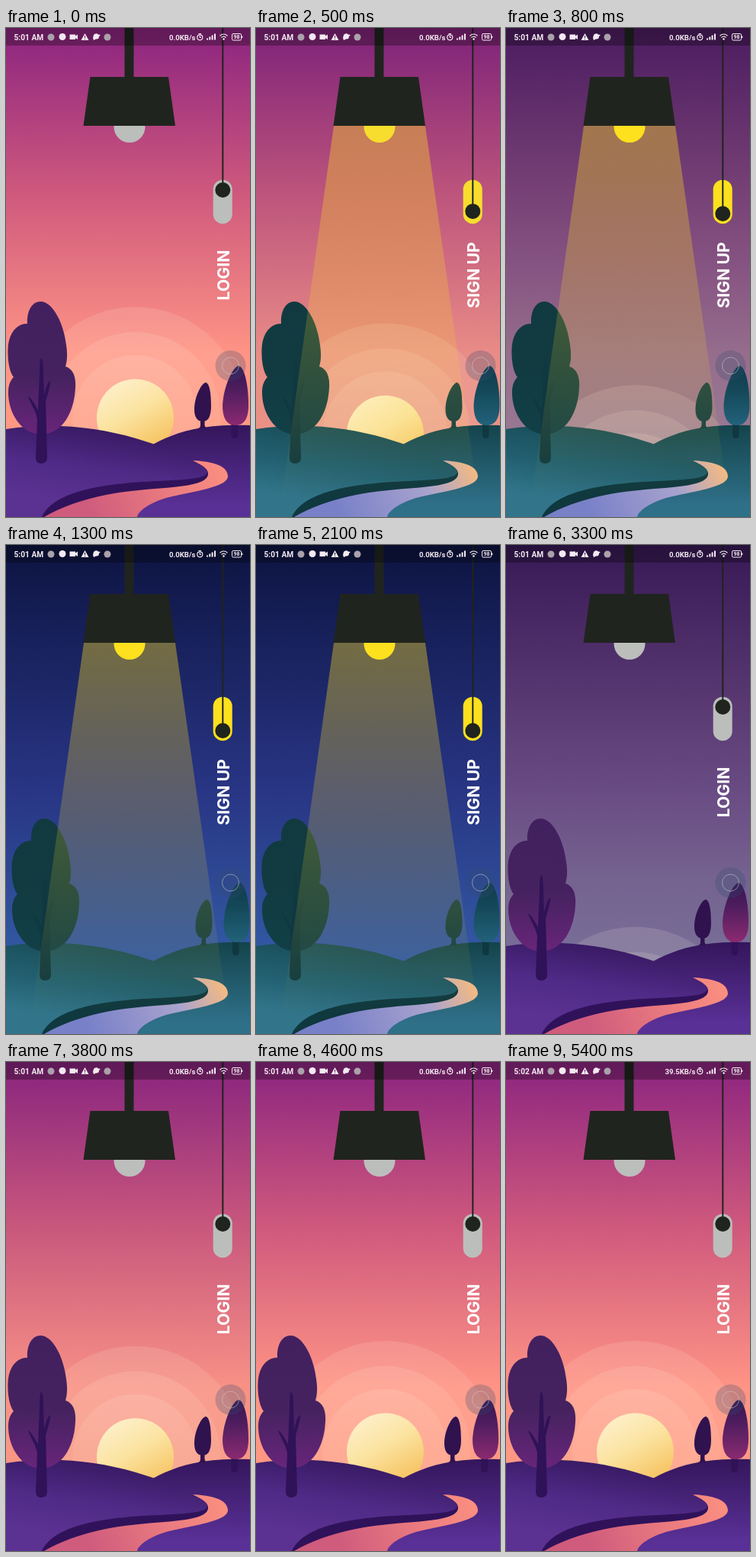
These frames come from a looping animation (320 px wide and 640 px high, 5500 ms). An HTML page:

```html
<!DOCTYPE html>
<html lang="en">
<head>
<meta charset="utf-8">
<title>Day and night lamp</title>
<style>
html, body { margin: 0; width: 100%; height: 100%; overflow: hidden; background: #8c2480; }
svg {
  display: block; width: 100%; height: 100%;
  --hill-top: #35185f; --hill-mid: #4f2a86; --hill-low: #5b3191;
  --back-top: #34165c; --back-low: #593096; --shade: #30125a;
  --road-a: #fb8f80; --road-b: #ee7f80; --road-c: #cf5b7d;
  --tree-top: #42205f; --tree-mid: #45225f; --tree-low: #68257a; --trunk: #2f1257;
  --pine: #30124f; --far-top: #35144f; --far-mid: #4f1d5f; --far-low: #8c2a70;
}
svg.night {
  --hill-top: #194a54; --hill-mid: #215f70; --hill-low: #32758a;
  --back-top: #14444c; --back-low: #2f7089; --shade: #0f383f;
  --road-a: #f5b983; --road-b: #a9a3cf; --road-c: #7880c8;
  --tree-top: #113a40; --tree-mid: #113b41; --tree-low: #123f47; --trunk: #0f3840;
  --pine: #123c44; --far-top: #103c4c; --far-mid: #144858; --far-low: #22627c;
}
.night .big { transform: translateX(5px); }
.night .small { transform: translateX(1.5px); }
.label { font: 700 21.3px Inter, sans-serif; fill: #fff; text-anchor: middle; }
.status { font: 700 10.2px Roboto, sans-serif; fill: #f3eaf2; }
.dark { fill: #20241e; }
</style>
</head>
<body>
<svg id="stage" viewBox="0 0 320 640" preserveAspectRatio="none">
  <defs>
    <linearGradient id="daySky" x2="0" y2="1">
      <stop stop-color="#8c2480"/><stop offset=".333" stop-color="#ce587d"/>
      <stop offset=".667" stop-color="#ff9485"/><stop offset="1" stop-color="#ff9d80"/>
    </linearGradient>
    <linearGradient id="nightSky" x2="0" y2="1">
      <stop stop-color="#0d1441"/><stop offset=".5" stop-color="#283584"/><stop offset="1" stop-color="#376ab2"/>
    </linearGradient>
    <linearGradient id="sunFill" x1=".2" y1="0" x2=".75" y2="1">
      <stop stop-color="#fdf0cd"/><stop offset=".45" stop-color="#fbe3a0"/><stop offset="1" stop-color="#f5bd55"/>
    </linearGradient>
    <linearGradient id="halo" x2="0" y2="1">
      <stop stop-color="#fff0e0" stop-opacity=".14"/><stop offset=".6" stop-color="#ffe8cc" stop-opacity=".08"/>
    </linearGradient>
    <linearGradient id="hill" gradientUnits="userSpaceOnUse" x1="140" y1="520" x2="125" y2="625">
      <stop style="stop-color:var(--hill-top)"/><stop offset=".55" style="stop-color:var(--hill-mid)"/>
      <stop offset="1" style="stop-color:var(--hill-low)"/>
    </linearGradient>
    <linearGradient id="back" gradientUnits="userSpaceOnUse" x1="0" y1="520" x2="0" y2="625">
      <stop style="stop-color:var(--back-top)"/><stop offset="1" style="stop-color:var(--back-low)"/>
    </linearGradient>
    <linearGradient id="road" gradientUnits="userSpaceOnUse" x1="285" y1="570" x2="110" y2="640">
      <stop style="stop-color:var(--road-a)"/><stop offset=".35" style="stop-color:var(--road-b)"/>
      <stop offset="1" style="stop-color:var(--road-c)"/>
    </linearGradient>
    <linearGradient id="leaves" x2="0" y2="1">
      <stop style="stop-color:var(--tree-top)"/><stop offset=".55" style="stop-color:var(--tree-mid)"/>
      <stop offset="1" style="stop-color:var(--tree-low)"/>
    </linearGradient>
    <linearGradient id="farLeaves" x2="0" y2="1">
      <stop style="stop-color:var(--far-top)"/><stop offset=".4" style="stop-color:var(--far-mid)"/>
      <stop offset="1" style="stop-color:var(--far-low)"/>
    </linearGradient>
    <linearGradient id="beamFill" gradientUnits="userSpaceOnUse" x1="0" y1="128" x2="0" y2="615">
      <stop stop-color="#fddc1e" stop-opacity=".4"/><stop offset="1" stop-color="#fddc1e" stop-opacity="0"/>
    </linearGradient>
  </defs>

  <rect width="320" height="640" fill="url(#daySky)"/>
  <rect id="dusk" width="320" height="640" fill="url(#nightSky)"/>

  <g id="sun">
    <g fill="url(#halo)">
      <circle cx="169.5" cy="510" r="145"/>
      <circle cx="169.5" cy="510" r="112"/>
      <circle cx="169.5" cy="510" r="82"/>
    </g>
    <circle cx="169.5" cy="510" r="50.5" fill="url(#sunFill)"/>
  </g>

  <!-- hills and road -->
  <path fill="url(#back)" d="M185 549C220 530 250 518 320 520V640H120V575Z"/>
  <path fill="url(#road)" d="M243 566C275 567 291 574 291 587C290 602 240 607 210 615C190 621 174 631 172 640H46L130 596L264 583Z"/>
  <path style="fill:var(--shade)" d="M243 566C256 571 266 577 265 584C264 597 235 600 195 603C145 607 96 614 50 640H0V600Z"/>
  <path fill="url(#hill)" d="M0 525C60 516 118 522 170 537C215 550 264 572 264 581C264 590 235 591 200 593C120 596 62 608 47 640H0Z"/>

  <!-- trees -->
  <g class="big">
    <path fill="url(#leaves)" d="M45 358C62 358 76 388 79 415C81 428 80 436 78 443C88 446 92 457 91 470C90 500 76 531 46 532C18 531 3 502 3 477C3 467 6 461 10 457C2 447 1 421 4 409C8 394 17 387 28 387C27 371 34 358 45 358Z"/>
    <path style="fill:var(--trunk)" d="M46 432C48 432 49 440 49 452L50 481C52 472 54 464 58 462C59 465 55 478 52 489L54 562Q54 570 46 570Q39 570 39 562L41 512C39 500 32 492 29 482C33 484 38 493 42 500L44 452C44 440 45 432 46 432Z"/>
  </g>
  <g class="small">
    <path style="fill:var(--pine)" d="M262 464C267 465 269 478 269 494C269 509 265 515 258 515C250 515 247 508 247 499C247 483 256 465 262 464ZM255 512H260.500V520Q261 523 264 524H252Q255 523 255 520Z"/>
    <path style="fill:var(--trunk)" d="M295.500 517H304V533Q304 537 300 537Q295.500 537 295.500 533Z"/>
    <path fill="url(#farLeaves)" d="M305 442C313 444 318 468 318 494C318 513 311 520 301 520C289 520 284 510 284 494C285 470 297 444 305 442Z"/>
  </g>

  <!-- lamp -->
  <path id="beam" fill="url(#beamFill)" d="M102 128H222L295 640H30Z"/>
  <circle id="bulb" cx="162" cy="129.500" r="20.500"/>
  <path class="dark" d="M155.500 0H167.500V64H213L222 128H101.500L110.500 64H155.500Z"/>

  <!-- pull switch -->
  <rect id="slot" x="271.700" y="198.700" width="25" height="57.500" rx="12.500"/>
  <path id="cord" stroke="#20241e" stroke-width="2"/>
  <circle id="knob" class="dark" cx="284.300" r="10"/>
  <text id="label" class="label" transform="translate(293 323.500) rotate(-90)"></text>

  <!-- touch button -->
  <circle cx="294.500" cy="442" r="20" fill="#334a70" fill-opacity=".27"/>
  <circle cx="294.500" cy="442" r="11" fill="none" stroke="#ccc" stroke-opacity=".55"/>

  <!-- status bar -->
  <rect width="320" height="23" fill-opacity=".3"/>
  <text id="clock" class="status" x="10.500" y="15.500"></text>
  <text id="speed" class="status" x="248.500" y="15.500" text-anchor="end" style="font-size:9.600px"></text>
  <g fill="#f3eaf2">
    <circle cx="59" cy="12" r="4.500" fill="#aaa1aa"/>
    <circle cx="74" cy="11.500" r="4.500"/>
    <path d="M83.500 8.500H91V10.500L94 8.500V15L91 13V15H83.500Z"/>
    <path fill-rule="evenodd" d="M103.500 7L108.500 16H98.500ZM103 10V13H104V10ZM103 14V15H104V14Z"/>
    <path d="M114 13L115 9Q118 6 121 8.500L124 9L122 11Q122 15 118 14.500L115 16Z"/>
    <circle cx="133" cy="12" r="4.500" fill="#aaa1aa"/>
    <path d="M263 13.500h2v2h-2zM266.300 11.500h2v4h-2zM269.600 9.500h2v6h-2zM273 7.500h2v8h-2z"/>
    <circle cx="285.500" cy="14.500" r="1.300"/>
    <text x="302.500" y="14.300" text-anchor="middle" style="font:700 7px Roboto,sans-serif">98</text>
  </g>
  <g fill="none" stroke="#f3eaf2" stroke-width="1.200">
    <circle cx="254.300" cy="12.300" r="3.500"/>
    <path d="M254.300 10V12.500H256M252.500 7.500H256"/>
    <path d="M280.500 10.200Q285.500 5.800 290.500 10.200M282.500 12.500Q285.500 9.800 288.500 12.500"/>
    <rect x="296.500" y="7.500" width="12" height="8.500" rx="1.500" stroke-width="1"/>
    <path d="M309.700 10.500V13"/>
  </g>
</svg>
<script>
const LOOP = 5500, ON = 300, OFF = 2910, FADE = 1000, PULL = 250;
const SUN_DROP = 204, CLOCK_TICK = 4800;
const GREY = [188, 190, 188], YELLOW = [253, 224, 30];
const $ = id => document.getElementById(id);
const clamp = x => Math.min(1, Math.max(0, x));
const ease = x => x * x * (3 - 2 * x);

// Eases up to 1 after ON and back to 0 after OFF, each over the given time.
const level = (t, time) => ease(clamp((t - ON) / time)) - ease(clamp((t - OFF) / time));
const mix = (a, b, k) => `rgb(${a.map((v, i) => Math.round(v + (b[i] - v) * k))})`;

function draw(t) {
  const lit = t >= ON && t < OFF;
  const dark = level(t, FADE), pull = level(t, PULL);
  const knobY = 212 + 31 * pull, glow = mix(GREY, YELLOW, pull);

  $('stage').classList.toggle('night', lit);
  $('dusk').setAttribute('opacity', dark);
  $('sun').setAttribute('transform', `translate(0 ${SUN_DROP * dark})`);
  $('beam').setAttribute('visibility', lit ? 'visible' : 'hidden');
  $('bulb').setAttribute('fill', glow);
  $('slot').setAttribute('fill', glow);
  $('knob').setAttribute('cy', knobY);
  $('cord').setAttribute('d', `M284.300 0V${knobY}`);
  $('label').textContent = lit ? 'SIGN UP' : 'LOGIN';
  $('clock').textContent = t < CLOCK_TICK ? '5:01 AM' : '5:02 AM';
  $('speed').textContent = t < CLOCK_TICK ? '0.0KB/s' : '39.5KB/s';
}

function tick() {
  draw(performance.now() % LOOP);
  requestAnimationFrame(tick);
}
tick();
</script>
</body>
</html>
```
